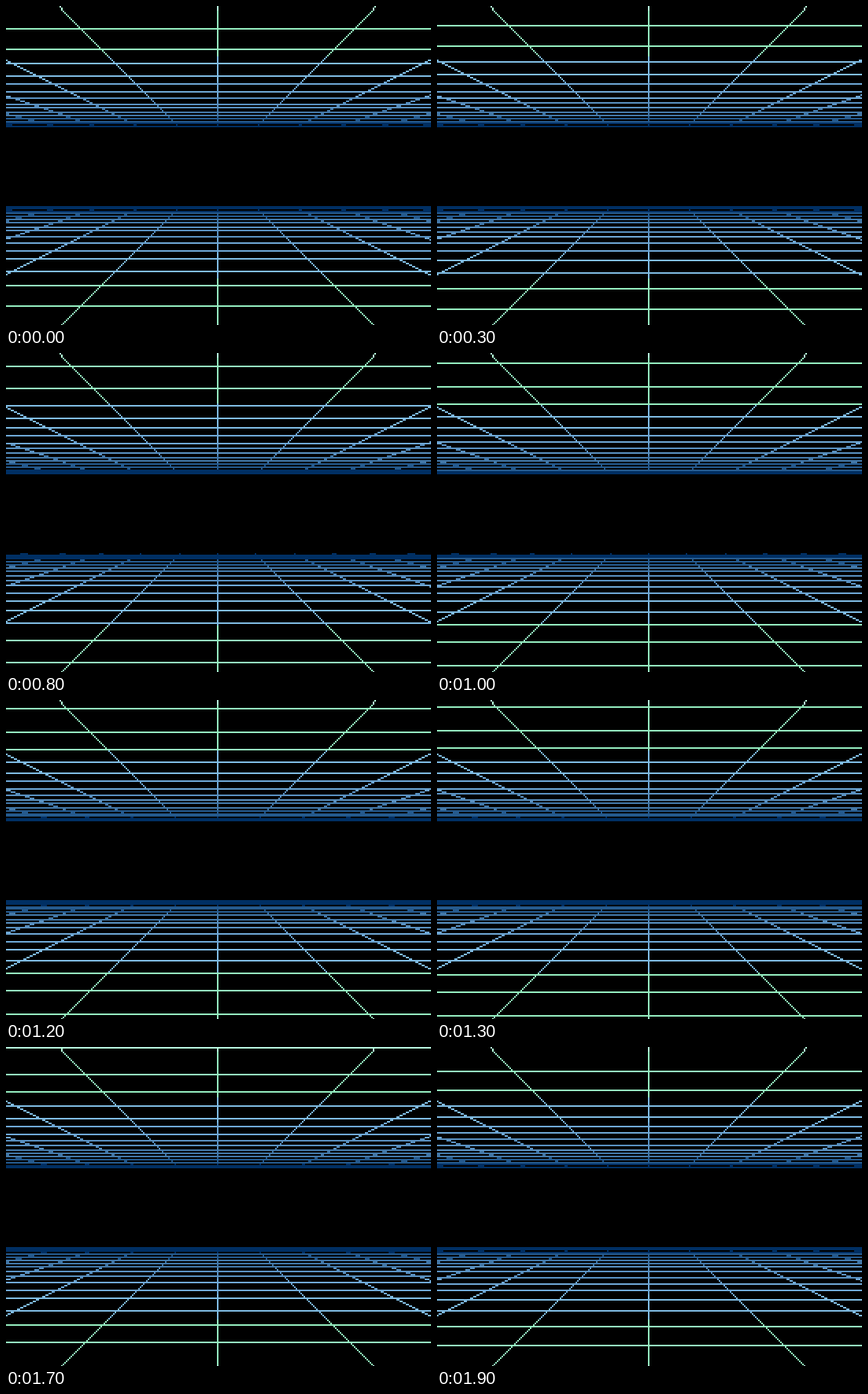
Animation, 540 px wide and 405 px high, one loop 2000 ms. Source, as an HTML page with a canvas:

```html
<!DOCTYPE html>
<html lang="en">
<head>
<meta charset="utf-8">
<title>Perspective grid</title>
<style>
  html, body { margin: 0; width: 100%; height: 100%; overflow: hidden; background: #000; }
  canvas { display: block; width: 540px; height: 405px; }
</style>
</head>
<body>
<canvas id="stage" width="540" height="405"></canvas>
<script>
const ctx = document.getElementById('stage').getContext('2d');

const CELL = 2, COLS = 270, ROWS = 203;
const CX = 134, CY = 102;          // vanishing point, in cells
const GAP_TOP = 77, GAP_END = 127; // empty band around the horizon
const FOCAL = 525.8;               // row offset = FOCAL / depth
const SLOPE = 0.99;                // column spread per row for the first rail
const RAILS = 5;
const LOOP = 2000, STEP = 100;

// Depth shades, near to far
const SHADES = ['#b4fbda', '#94ecbf', '#7fbbe2', '#6ea7d5', '#5990c0',
                '#4378a8', '#255a8e', '#002f63'];
const NEAR = 5.3, BAND = 2.2;

function shade(z) {
  const i = Math.ceil((z - NEAR) / BAND);
  return SHADES[Math.max(0, Math.min(SHADES.length - 1, i))];
}

function cells(x, y, w) {
  ctx.fillRect(x * CELL, y * CELL, w * CELL, CELL);
}

function visible(y) {
  return y >= 0 && y < ROWS && (y < GAP_TOP || y >= GAP_END);
}

function drawRails() {
  for (let y = 0; y < ROWS; y++) {
    if (!visible(y)) continue;
    const d = Math.abs(y - CY);
    ctx.fillStyle = shade(FOCAL / d);
    cells(CX, y, 1);
    for (let n = 1; n <= RAILS; n++) {
      const a = Math.round(n * SLOPE * (d - 0.5));
      const b = Math.max(a + 1, Math.round(n * SLOPE * (d + 0.5)));
      cells(CX + a, y, b - a);
      cells(CX - b + 1, y, b - a);
    }
  }
}

function drawRungs(shift) {
  for (let n = 5; n <= 22; n++) {
    const z = n + 1 - shift;
    const d = Math.round(FOCAL / z);
    ctx.fillStyle = shade(z);
    for (const y of [CY - d, CY + d]) {
      if (visible(y)) cells(0, y, COLS);
    }
  }
}

function draw(ms) {
  const shift = Math.floor((ms % LOOP) / STEP) * STEP / LOOP;
  ctx.fillStyle = '#000';
  ctx.fillRect(0, 0, 540, 405);
  drawRails();
  drawRungs(shift);
}

const start = performance.now();
function tick() {
  draw(performance.now() - start);
  requestAnimationFrame(tick);
}
tick();
</script>
</body>
</html>
```
